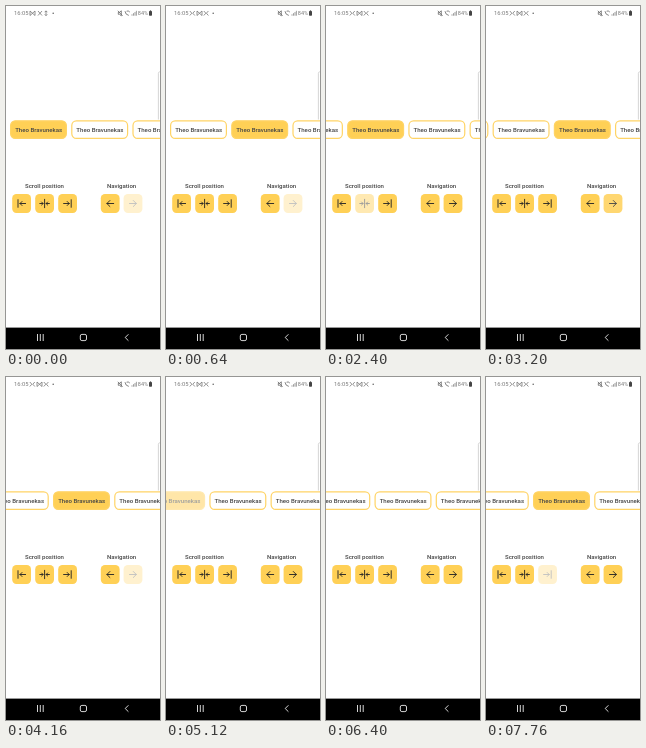
Recreate the animation shown at these times as an HTML page. Size 154 by 343 pixels, loop 8 s.

```html
<!DOCTYPE html>
<html lang="en">
<head>
<meta charset="utf-8">
<title>Scrolling tabs</title>
<style>
  html, body { margin: 0; width: 100%; height: 100%; overflow: hidden; background: #fff; }
  svg { display: block; width: 154px; height: 343px; }
  text { font-family: Roboto, Arial, sans-serif; font-size: 6.08px; font-weight: 500; fill: #444; text-anchor: middle; }
  .status text { font-size: 5.8px; font-weight: 400; fill: #777; text-anchor: start; }
  .line { fill: none; stroke: #2c2a26; stroke-width: .95; stroke-linecap: round; stroke-linejoin: round; }
  .tab rect { stroke: #ffd466; stroke-width: 1.2; }
</style>
</head>
<body>
<svg viewBox="0 0 154 343">
  <g class="status">
    <text x="8" y="9.4">16:05</text>
    <g fill="none" stroke="#777" stroke-width=".8">
      <path id="iconsA" d="M24 5V9.5L29 5V9.5ZM32 5L36 9.5M36 5L32 9.5M40 5V9.5M38.7 6.2L40 4.8L41.3 6.2M38.7 8.3L40 9.7L41.3 8.3"/>
      <path id="iconsB" d="M23.8 5L25.8 7.2L23.8 9.5M28.8 5L26.8 7.2L28.8 9.5M31 5V9.5L36 5V9.5ZM37.8 5L39.8 7.2L37.8 9.5M42.4 5L40.4 7.2L42.4 9.5"/>
    </g>
    <circle cx="47.2" cy="7.3" r=".8" fill="#666"/>
    <g fill="none" stroke="#666" stroke-width=".8">
      <path d="M112.3 6.3H113.5L115.3 4.8V9.8L113.5 8.3H112.3ZM111.8 4.8L116.6 9.8"/>
      <path d="M119 5.2Q119.4 8.8 122.8 9.4M120.6 5.2Q122.4 4.4 123.8 6"/>
      <path d="M126 9.7V8.3M127.5 9.7V7.2M129 9.7V6M130.4 9.7V4.8" stroke="#888"/>
    </g>
    <text x="131.8" y="9.4" style="font-size:5.5px">84%</text>
    <rect x="143" y="5" width="3" height="4.8" rx=".7" fill="#444"/>
    <rect x="143.9" y="4.4" width="1.2" height="1" fill="#444"/>
  </g>

  <path d="M154 65.8H153.6Q152.4 65.9 152.4 67.5V113.5" fill="none" stroke="#ccc" stroke-width=".8"/>
  <g id="tabs"></g>

  <text x="38.5" y="182">Scroll position</text>
  <text x="115.6" y="182">Navigation</text>
  <g id="buttons"></g>

  <rect y="321.6" width="154" height="21.4"/>
  <g fill="none" stroke="#eee" stroke-width=".9">
    <path d="M31.5 328V335M34.3 328V335M37.2 328V335"/>
    <rect x="74.3" y="328.4" width="6.2" height="6.2" rx="1.6"/>
    <path d="M122.4 328.3L119.2 331.5L122.4 334.7"/>
  </g>
</svg>
<script>
const LOOP = 8000, PITCH = 61.2, START = 4, CENTER = 47, COUNT = 11;
const NAME = 'Theo Bravunekas';
const $ = id => document.getElementById(id);

function add(parent, tag, attrs, text) {
  const el = document.createElementNS('http://www.w3.org/2000/svg', tag);
  for (const k in attrs) el.setAttribute(k, attrs[k]);
  if (text) el.textContent = text;
  return parent.appendChild(el);
}

const tabs = Array.from({ length: COUNT }, () => {
  const g = add($('tabs'), 'g', { class: 'tab' });
  const box = add(g, 'rect', { x: .6, y: 114.8, width: 55.8, height: 17.6, rx: 4.6 });
  add(g, 'text', { x: 28.7, y: 125.9 }, NAME);
  return { g, box };
});

// Icons are drawn around the middle of their button.
const icons = {
  left: [6.2, 'M-3.6 -3.8V3.8M4 0H-1.6M.4 -2L-1.6 0L.4 2'],
  center: [29.2, 'M0 -4.2V4.2M-4.8 0H-1.6M-3 -1.5L-1.5 0L-3 1.5M4.8 0H1.6M3 -1.5L1.5 0L3 1.5'],
  right: [52.2, 'M3.6 -3.8V3.8M-4 0H1.6M-.4 -2L1.6 0L-.4 2'],
  prev: [94.8, 'M3.5 0H-3.3M-.3 -3L-3.3 0L-.3 3'],
  next: [117.6, 'M-3.5 0H3.3M.3 -3L3.3 0L.3 3']
};
const buttons = {};
for (const key in icons) {
  const [x, d] = icons[key];
  const g = buttons[key] = add($('buttons'), 'g', { transform: `translate(${x + 9.4} 197.5)` });
  add(g, 'rect', { x: -9.4, y: -9.4, width: 18.8, height: 18.8, rx: 4.2, fill: '#ffd056' });
  add(g, 'path', { d, class: 'line' });
}

const clamp = u => Math.min(1, Math.max(0, u));
const smooth = u => u * u * (3 - 2 * u);
const fling = u => 1 - (1 - u) ** 2.55;

// from, to, x of the first tab at the end, easing
const moves = [
  [70, 480, START - PITCH],
  [660, 980, START - 2 * PITCH],
  [1304, 1700, START - PITCH],
  [2280, 2560, CENTER - PITCH],
  [2960, 3356, CENTER - 2 * PITCH],
  [3600, 4020, CENTER - 3 * PITCH],
  [4290, 4600, CENTER - 4 * PITCH],
  [4880, 6400, CENTER + 1.5 - 7 * PITCH, fling],
  [6940, 7340, CENTER - 7 * PITCH]
];
const picks = [[0, 0], [80, 1], [640, 2], [1280, 1], [2960, 2], [3600, 3], [4300, 4], [6940, 7]];
const presses = {
  next: [[-200, 80], [560, 660], [2710, 2980], [3400, 3590], [4090, 4300]],
  prev: [[1090, 1300]],
  center: [[2130, 2300]],
  right: [[7690, 8300]]
};
const tabPresses = { 4: [[4760, 5000]], 7: [[6690, 6940]] };

function scrollAt(t) {
  let x = START;
  for (const [a, b, to, ease = smooth] of moves) x += (to - x) * ease(clamp((t - a) / (b - a)));
  return x;
}

function opacityAt(t, list = []) {
  return list.reduce((o, [down, up]) => {
    const held = clamp((t - down) / 60) * (1 - smooth(clamp((t - up) / 320)));
    return Math.min(o, 1 - .72 * held);
  }, 1);
}

function draw() {
  const t = performance.now() % LOOP;
  const x = scrollAt(t);
  const active = picks.filter(p => p[0] <= t).pop()[1];
  tabs.forEach(({ g, box }, i) => {
    g.setAttribute('transform', `translate(${(x + i * PITCH).toFixed(2)} 0)`);
    g.setAttribute('opacity', opacityAt(t, tabPresses[i]));
    box.setAttribute('fill', i === active ? '#ffd056' : '#fff');
  });
  for (const key in buttons) buttons[key].setAttribute('opacity', opacityAt(t, presses[key]));
  $('iconsA').setAttribute('opacity', t < 80 ? 1 : 0);
  $('iconsB').setAttribute('opacity', t < 80 ? 0 : 1);
  requestAnimationFrame(draw);
}
draw();
</script>
</body>
</html>
```
